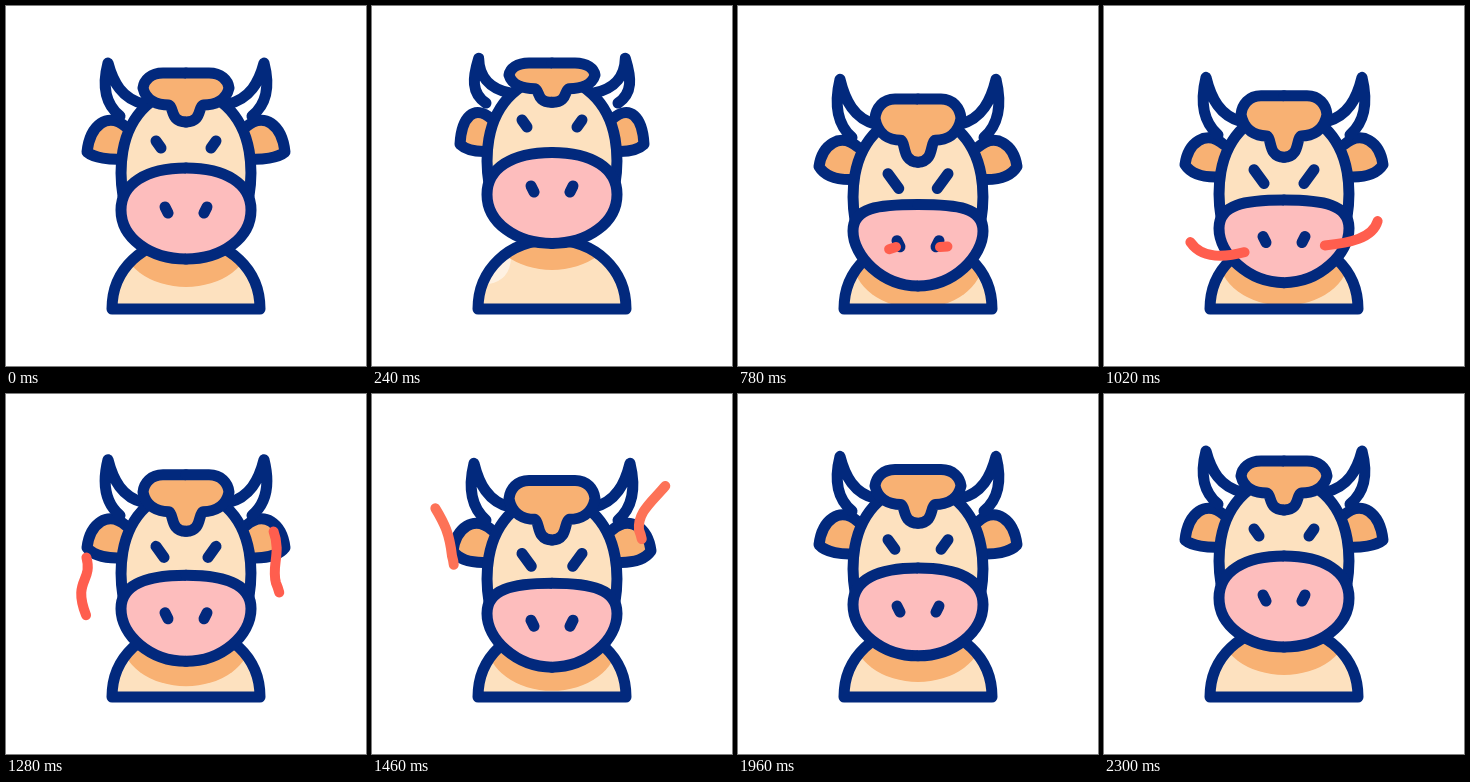
Animation, 360 px wide and 360 px high, one loop 2.4 s. Source, as an HTML page:

```html
<!DOCTYPE html>
<html lang="en">
<head>
<meta charset="utf-8">
<title>Angry bull</title>
<style>
  html, body { margin: 0; height: 100%; overflow: hidden; background: #fff; }
  svg { display: block; width: 100vw; height: 100vh; stroke-linecap: round; stroke-linejoin: round; }
</style>
</head>
<body>
<svg id="stage" viewBox="0 0 360 360"></svg>
<script>
const NAVY = '#02297d', CREAM = '#fde1bf', TAN = '#f8b173', PINK = '#fdbdbd';
const LOOP = 2400, STEP = 20, LAST = 2300;
const stage = document.getElementById('stage');
const clamp = (x, lo = 0, hi = 1) => Math.min(hi, Math.max(lo, x));

// Turning points of the nod as [time, pose]: -1 raised, 0 at rest, 1 lowered.
const nods = [[0, 0], [400, -1.2], [820, 1.02], [1340, .49], [1580, .95], [2200, 0]];

function nod(t) {
  const i = nods.findIndex(([time]) => time > t);
  if (i < 0) return 0;
  const [[t0, from], [t1, to]] = [nods[i - 1], nods[i]];
  const u = (t - t0) / (t1 - t0);
  return from + (to - from) * u * u * (3 - 2 * u);
}

const line = (d, fill = 'none') =>
  `<path d="${d}" fill="${fill}" stroke="${NAVY}" stroke-width="11"/>`;

const mirrored = half => half + `<g transform="matrix(-1 0 0 1 360 0)">${half}</g>`;

// Parts are left halves at rest; they shift with the nod and stretch below `top`.
function part(p, d, fill, rise, drop, { top = 0, squash = 0, stretch = 0 } = {}) {
  const shift = p * (p < 0 ? rise : drop);
  const scale = 1 + p * (p < 0 ? squash : stretch);
  const moved = d.replace(/([\d.]+) ([\d.]+)/g,
    (_, x, y) => `${x} ${top + (y - top) * scale + shift}`);
  return mirrored(line(moved, fill));
}

function head(p) {
  const up = Math.max(-p, 0), down = Math.max(p, 0), flat = 13 * down;
  return [
    part(p, `M120 121C102 105 ${84 + 7 * up} 119 ${81 + 9 * up} ${146 - 6 * down}
      C${88 + 8 * up} 152 104 154 118 153`, TAN, 10, 21),
    part(p, `M114 110C99 98 ${96 + 6 * up} 80 ${102 + 6 * up} 57C107 76 116 93 138 98`, '#fff', 6, 17,
      { top: 57, squash: .2, stretch: .1 }),
    part(p, 'M180 82C165 82 153 88 140 100C113 125 113 165 117 190L180 190', CREAM, 15.5, 25),
    part(p, 'M180 67L157 67C145 67 138 74 137 82C140 95 152 99 163 99C168 101 164 116 180 116', TAN, 13, 27,
      { top: 67, squash: .25, stretch: .3 }),
    part(p, `M180 162C140 162 115 ${178 - flat} 115 ${204 - flat}
      C115 ${232 - flat} 144 253 180 253`, PINK, 20, 38, { top: 162, stretch: -.11 }),
    part(p, `M150 135L${155 + 6 * down} ${142 + 8 * down}`, 'none', 27, 34),
    part(p, 'M159 201L162 207', 'none', 27, 35)
  ].join('');
}

const torso = 'M106 303C106 264 136 234 180 234S254 264 254 303Z';

function body(p) {
  return `<clipPath id="torso"><path d="${torso}"/></clipPath>
    <g clip-path="url(#torso)">
      <path d="${torso}" fill="${CREAM}"/>
      <path d="M117 278Q117 258 132 246L139 252Q138 274 117 278Z" fill="#fff" opacity="${clamp(-p * 2 - 1)}"/>
      <ellipse cx="180" cy="${233 + 22 * p}" rx="65" ry="48" fill="${TAN}"/>
    </g>` + line(torso);
}

const steamPaths = [
  'M158 241C130 250 90 262 80 221C66 185 88 188 80 162C77 135 70 125 57 104',
  'M202 241C240 238 290 236 270 189C265 172 276 158 267 136C265 115 285 105 301 82'
];

// Each puff is a dash, in percent of its path, that runs outwards and fades to tan.
function steam(t) {
  const front = clamp((t - 755) * .134, 0, 100), back = clamp((t - 957) * .133, 0, 100);
  if (front <= 0 || back >= 100) return '';
  const fade = clamp((t - 1400) / 250);
  const color = `rgb(${255 - 7 * fade},${94 + 83 * fade},${78 + 37 * fade})`;
  return steamPaths.map(d => `<path d="${d}" pathLength="100" fill="none" stroke="${color}"
    stroke-width="10" stroke-dasharray="${front - back} 300" stroke-dashoffset="${-back}"/>`).join('');
}

function tick() {
  const elapsed = performance.now() % LOOP;
  const t = Math.min(LAST, Math.floor(elapsed / STEP) * STEP);
  const p = nod(t);
  stage.innerHTML = body(p) + head(p) + steam(t);
  requestAnimationFrame(tick);
}
tick();
</script>
</body>
</html>
```
